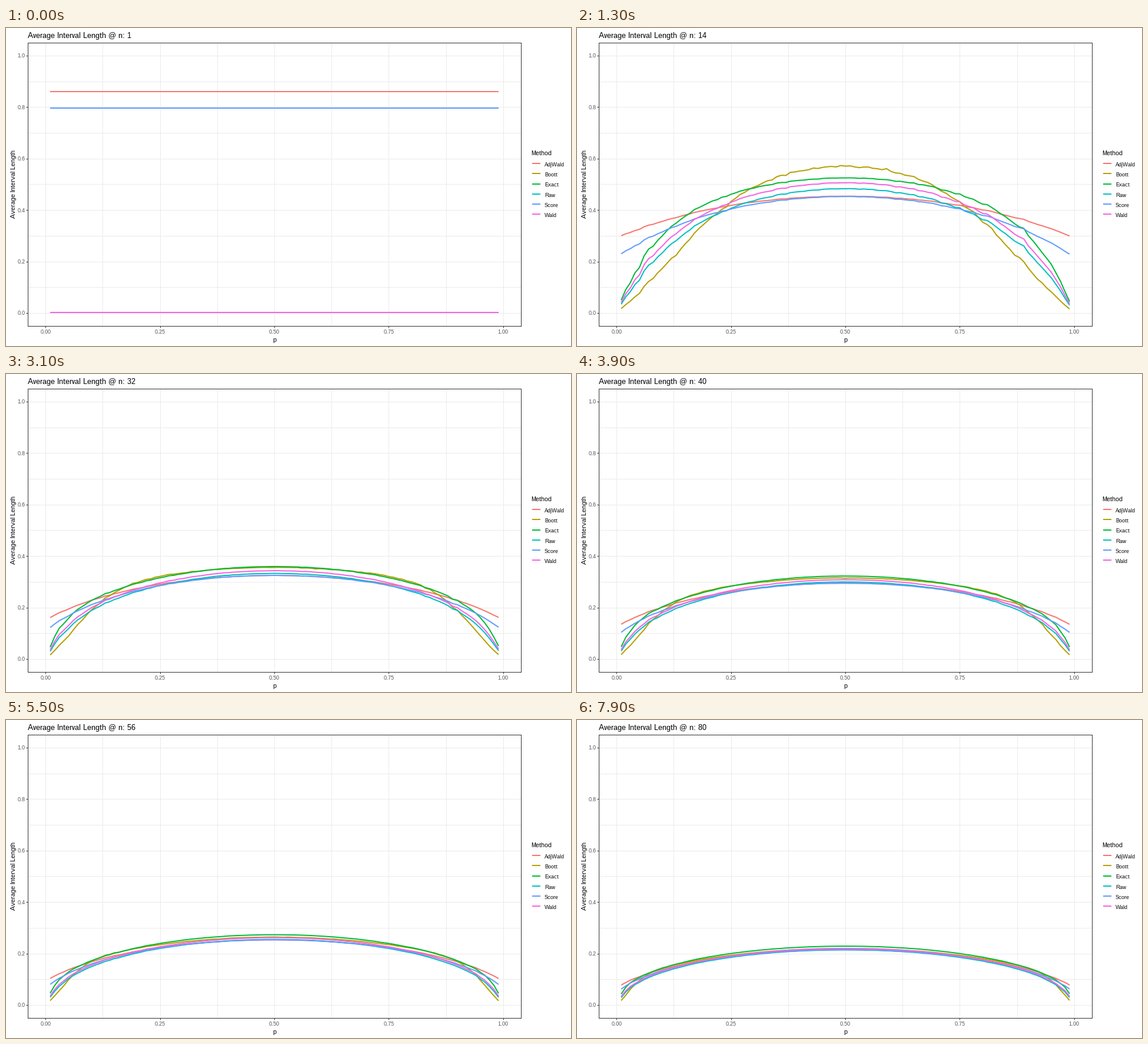
Animation of 960 by 540 pixels, one loop 8000 ms. Source, as a matplotlib script:

```python
from math import comb

import numpy as np
import matplotlib.pyplot as plt
from matplotlib.animation import FuncAnimation
from matplotlib.lines import Line2D
from matplotlib.transforms import ScaledTranslation

W, H, DPI = 960, 540, 72
STEPS, SIMS, BOOT = 80, 2500, 200
Z, TAIL = 1.96, 0.025
METHODS = {
    "AdjWald": "#F8766D", "Boott": "#B79F00", "Exact": "#00BA38",
    "Raw": "#00BFC4", "Score": "#619CFF", "Wald": "#F564E3",
}
P = np.arange(1, 100) / 100


def choose(n, ks):
    return np.array([comb(n, int(k)) for k in ks], float)


def pmf(n, p):
    """Binomial probabilities, one row per p."""
    k = np.arange(n + 1)
    p = np.asarray(p)[..., None]
    return choose(n, k) * p**k * (1 - p) ** (n - k)


def wald(p, n):
    return 2 * Z * np.sqrt(p * (1 - p) / n)


def clopper(n):
    """Clopper-Pearson lengths for x = 1 .. n-1, by bisection."""
    x, k = np.arange(1, n), np.arange(n + 1)
    lo, hi = np.zeros(n - 1), np.ones(n - 1)
    for _ in range(30):
        mid = (lo + hi) / 2
        high = np.where(k >= x[:, None], pmf(n, mid), 0).sum(1) > TAIL
        lo, hi = np.where(high, lo, mid), np.where(high, mid, hi)
    return 1 - lo[::-1] - lo


def order_mean(vals, weights, j, m):
    """Expected j-th smallest of m draws from a discrete law."""
    cdf = np.clip(np.cumsum(weights), 0, 1)[:, None]
    i = np.arange(j)
    below = (choose(m, i) * cdf**i * (1 - cdf) ** np.maximum(m - i, 0)).sum(1)
    return vals @ np.diff(1 - below, prepend=0)


def low_quantile(vals, weights, m):
    h = TAIL * (m - 1)
    j = int(h)
    a, b = (order_mean(vals, weights, j + d, m) for d in (1, 2))
    return a + (h - j) * (b - a)


def boot_span(vals, weights, m):
    """Expected distance between the two resampled tail quantiles."""
    return -low_quantile(vals, weights, m) - low_quantile(-vals[::-1], weights[::-1], m)


def lengths(n):
    """Interval length of each method for every count x = 0 .. n."""
    x = np.arange(n + 1)
    p = x / n
    se = np.sqrt(p * (1 - p) / n)
    prob = pmf(n, p)
    exact, raw, boott = np.zeros((3, n + 1))
    exact[1:-1] = clopper(n)
    for i in range(1, n):
        raw[i] = boot_span(p, prob[i], BOOT)
        inner = prob[i, 1:-1]
        keep = inner.sum()
        t = (p[1:-1] - p[i]) / se[1:-1]
        boott[i] = se[i] * boot_span(t, inner / keep, max(1, round(BOOT * keep)))
    score = 2 * Z * np.sqrt(se**2 + Z**2 / (4 * n**2)) / (1 + Z**2 / n)
    return np.array([wald((x + 2) / (n + 4), n + 4), boott, exact, raw, score, wald(p, n)])


def simulate(n, rng):
    counts = rng.multinomial(SIMS, pmf(n, P))
    curves = lengths(n) @ counts.T / SIMS
    curves[1] *= 1 + rng.normal(0, 0.05 / n, P.size)
    return curves


rng = np.random.default_rng(7)
data = [simulate(n, rng) for n in range(1, STEPS + 1)]

plt.rcParams.update({
    "font.family": "Liberation Sans",
    "text.hinting": "native",
    "text.hinting_factor": 1,
})
fig = plt.figure(figsize=(W / DPI, H / DPI), dpi=DPI, facecolor="white")


def label(x, y, text, size, color="black", **kw):
    kw.setdefault("va", "baseline")
    return fig.text(x / W, 1 - y / H, text, fontsize=size, color=color, **kw)


left, right, top, bottom = 37, 875, 25, 506
ax = fig.add_axes([left / W, 1 - bottom / H, (right - left) / W, (bottom - top) / H])
ax.set(xlim=(-0.039, 1.039), ylim=(-0.05, 1.05))
ax.set_xticks(np.arange(0, 1.01, 0.25))
ax.set_yticks(np.arange(0, 1.01, 0.2))
ax.set_xticks(np.arange(0.125, 1, 0.25), minor=True)
ax.set_yticks(np.arange(0.1, 1, 0.2), minor=True)
ax.set_axisbelow(True)
ax.grid(which="both", color="#EBEBEB", lw=1)
ax.tick_params(length=3, width=1, color="#333333", labelbottom=False, labelleft=False)
ax.tick_params(which="minor", length=0)
for spine in ax.spines.values():
    spine.set(color="#333333", linewidth=1)

for v in ax.get_xticks():
    px = left + (v + 0.039) / 1.078 * (right - left)
    label(px, 519, f"{v:.2f}", 9, "#4D4D4D", ha="center")
for v in ax.get_yticks():
    py = bottom - (v + 0.05) / 1.1 * (bottom - top)
    label(32.5, py + 3.3, f"{v:.1f}", 9, "#4D4D4D", ha="right")

title = label(37, 17, "", 13)
label(456, 533, "p", 11, ha="center")
label(15.5, 265, "Average Interval Length", 11, rotation=90,
      ha="center", rotation_mode="anchor")
label(892, 216, "Method", 11)

# Two-pixel strokes sit one pixel above the hairline grid.
lift = ax.transData + ScaledTranslation(0, 1 / DPI, fig.dpi_scale_trans)
style = dict(lw=2, solid_capstyle="butt", solid_joinstyle="round")
lines = []
for i, (name, color) in enumerate(METHODS.items()):
    y = 230 + 17.28 * i
    fig.add_artist(Line2D([894 / W, 907.5 / W], [1 - y / H] * 2, color=color, **style))
    label(915, y + 4.9, name, 9)
    lines += ax.plot(P, data[0][i], color=color, transform=lift, **style)


def update(step):
    title.set_text(f"Average Interval Length @ n: {step + 1}")
    for line, curve in zip(lines, data[step]):
        line.set_ydata(curve)
    return [title, *lines]


anim = FuncAnimation(fig, update, frames=STEPS, interval=1000 // 10, repeat=True, repeat_delay=0)
plt.show()
```
